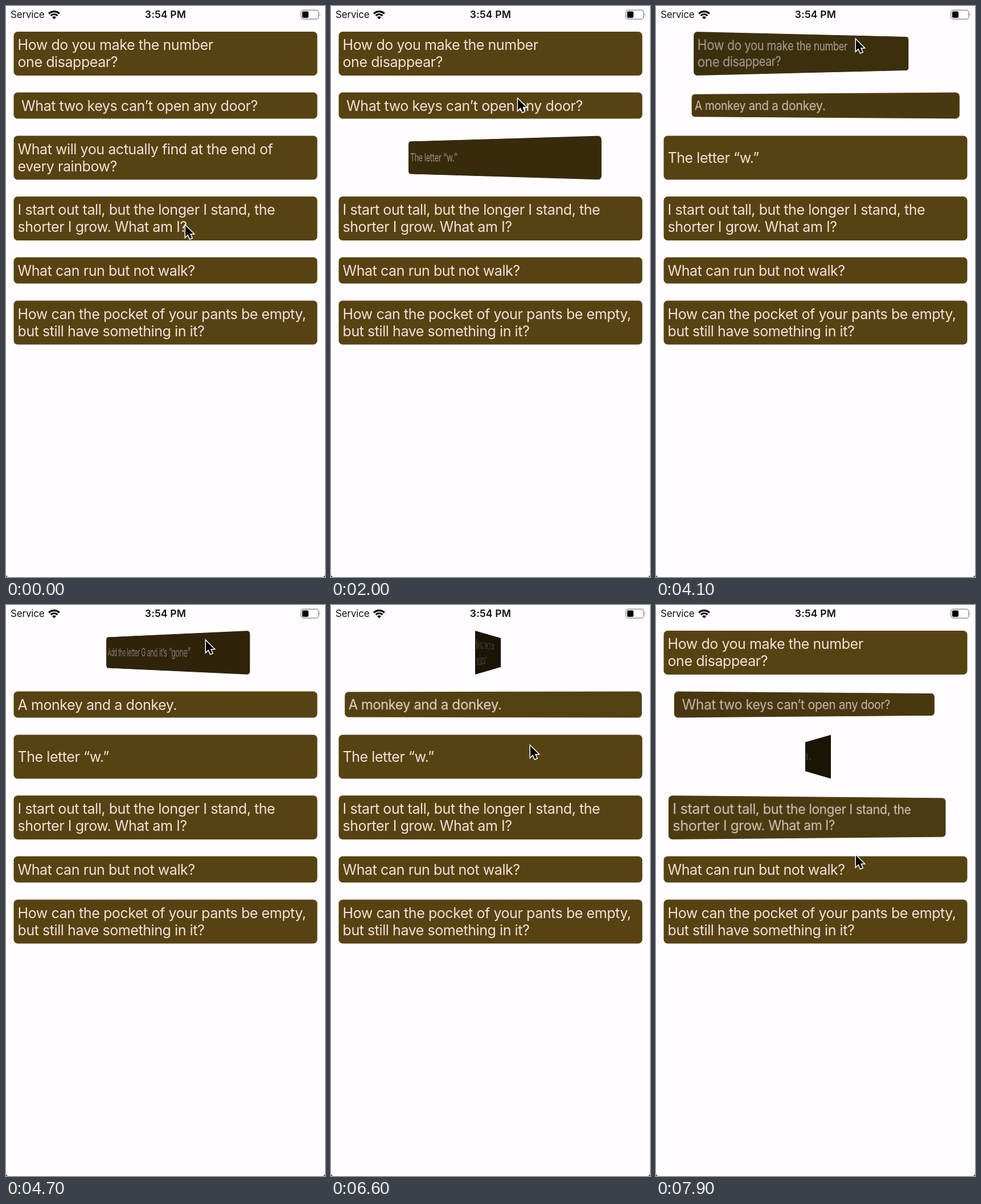
Animation of 560 by 1001 pixels, one loop 8000 ms. Source, as an HTML page:

```html
<!DOCTYPE html>
<html lang="en">
<head>
<meta charset="utf-8">
<title>Riddle cards</title>
<style>
  html, body { margin: 0; width: 100%; height: 100%; overflow: hidden; background: #fffdff; }
  body { position: relative; font-family: Inter, "Liberation Sans", sans-serif; font-optical-sizing: none; }
  .status { position: absolute; top: 5px; line-height: 20px; color: #111; white-space: pre; }
  .network { left: 8px; font-size: 17px; letter-spacing: -.2px; }
  .clock { left: 0; width: 560px; text-align: center; font-size: 17.5px; font-weight: 600; letter-spacing: .2px; }
  .overlay { position: absolute; left: 0; top: 0; }
  .card {
    position: absolute; left: 0; top: 0; width: 533px; box-sizing: border-box; padding-left: 7px;
    display: flex; align-items: center; border-radius: 7px;
    background: #574312; color: #f3e0da;
    /* faint margin keeps tilted edges antialiased */
    box-shadow: 0 0 0 3px rgba(255, 253, 255, .01);
    font-size: 25px; line-height: 30px; letter-spacing: -.43px; white-space: pre;
  }
  .card::after {
    content: ""; position: absolute; inset: 0; border-radius: inherit;
    background: #000; opacity: var(--shade, 0);
  }
</style>
</head>
<body>
<div class="status network">Service</div>
<div class="status clock">3:54 PM</div>
<div id="cards"></div>
<svg class="overlay" width="560" height="1001" viewBox="0 0 560 1001">
  <g fill="none" stroke="#000" stroke-width="3.2">
    <path d="M75.2 13.4A13.3 13.3 0 0 1 93.8 13.4"/>
    <path d="M78.6 16.9A8.4 8.4 0 0 1 90.4 16.9"/>
  </g>
  <path d="M84.5 23.2L81 19.6A5 5 0 0 1 88 19.6Z"/>
  <rect x="517.8" y="7.3" width="31" height="15.6" rx="4" fill="none" stroke="#98969a" stroke-width="1.5"/>
  <rect x="520" y="9.5" width="11" height="11.2" rx="2"/>
  <path d="M550.5 12.5Q553 15 550.5 17.7Z" fill="#98969a"/>
  <path d="M0 996Q0 1001 5 1001H0ZM560 996Q560 1001 555 1001H560Z" fill="#333"/>
  <path id="cursor" d="M2 3V22.5L6.5 18.3L9.8 26L13.2 24.6L10 17.2L16 17Z"
        stroke="#fff" stroke-width="3" paint-order="stroke"/>
</svg>
<script>
const LOOP = 8000, STEP = 100, FLIP = 2000;
const LEFT = 13.5, HALF_WIDTH = 266.5, DEPTH = 1030, MAX_SHADE = .75;

const cards = [
  { top: 45, height: 76.5, faces: ['How do you make the number\none disappear?', 'Add the letter G and it’s “gone”'] },
  { top: 151.5, height: 45.5, faces: [' What two keys can’t open any door?', 'A monkey and a donkey.'] },
  { top: 227.5, height: 76.5, faces: ['What will you actually find at the end of\nevery rainbow?', 'The letter “w.”'] },
  { top: 334, height: 76.5, faces: ['I start out tall, but the longer I stand, the\nshorter I grow. What am I?', ''] },
  { top: 440.5, height: 45.5, faces: ['What can run but not walk?'] },
  { top: 516.5, height: 76.5, faces: ['How can the pocket of your pants be empty,\nbut still have something in it?'] }
];

// dir 1 turns question to answer, -1 turns it back
const flips = [
  { card: 2, start: 677, dir: 1 },
  { card: 1, start: 2546, dir: 1 },
  { card: 0, start: 3475, dir: 1 },
  { card: 0, start: 5562, dir: -1 },
  { card: 1, start: 6380, dir: -1 },
  { card: 2, start: 6938, dir: -1 },
  { card: 3, start: 7503, dir: 1 }
];

// time, x, y
const path = [
  [0, 313, 382], [500, 322, 262], [1400, 322, 256], [1900, 326, 160], [2600, 330, 160],
  [3000, 357, 95], [3400, 350, 60], [4100, 349, 56], [4800, 349, 60], [5400, 349, 92],
  [5700, 349, 92], [6200, 349, 165], [6400, 349, 165], [6600, 348, 244], [7000, 349, 250],
  [7400, 349, 355], [7500, 349, 360], [7800, 349, 436], [8000, 349, 436]
];

const cursor = document.getElementById('cursor');
for (const card of cards) {
  card.el = document.createElement('div');
  card.el.className = 'card';
  card.el.style.height = card.height + 'px';
  card.label = card.el.appendChild(document.createElement('span'));
  document.getElementById('cards').append(card.el);
}

const smooth = s => s * s * (3 - 2 * s);

// cubic-bezier(.42, 0, .58, 1)
function easeInOut(x) {
  if (x <= 0 || x >= 1) return x <= 0 ? 0 : 1;
  let lo = 0, hi = 1, s = .5;
  for (let i = 0; i < 24; i++) {
    s = (lo + hi) / 2;
    const u = 1 - s;
    if (1.26 * s * u * u + 1.74 * s * s * u + s * s * s < x) lo = s; else hi = s;
  }
  return smooth(s);
}

function drawCard(card, index, t) {
  let face = 0, angle = 0;
  for (const { card: target, start, dir } of flips) {
    if (target !== index || t < start) continue;
    const turn = easeInOut((t - start) / FLIP);
    const past = turn >= .5;
    face = (dir > 0) === past ? 1 : 0;
    angle = dir * 180 * (past ? turn - 1 : turn);
  }
  if (card.label.textContent !== card.faces[face]) card.label.textContent = card.faces[face];
  // Push back so that the nearer edge stays on the screen plane
  const back = HALF_WIDTH * Math.abs(Math.sin(angle * Math.PI / 180));
  const tilt = angle ? `perspective(${DEPTH}px) translateZ(${-back}px) rotateY(${angle}deg)` : '';
  card.el.style.transform = `translate(${LEFT}px, ${card.top}px) ${tilt}`;
  card.el.style.setProperty('--shade', MAX_SHADE * Math.abs(angle) / 90);
}

function drawCursor(t) {
  const i = path.findIndex(p => p[0] > t);
  const [t0, x0, y0] = path[i - 1], [t1, x1, y1] = path[i];
  const k = smooth((t - t0) / (t1 - t0));
  cursor.setAttribute('transform', `translate(${x0 + (x1 - x0) * k} ${y0 + (y1 - y0) * k})`);
}

const began = performance.now();
function draw(now) {
  const elapsed = Math.max(0, now - began) % LOOP;
  const t = Math.floor(elapsed / STEP) * STEP;
  cards.forEach((card, i) => drawCard(card, i, t));
  drawCursor(t);
  requestAnimationFrame(draw);
}
draw(began);
</script>
</body>
</html>
```
